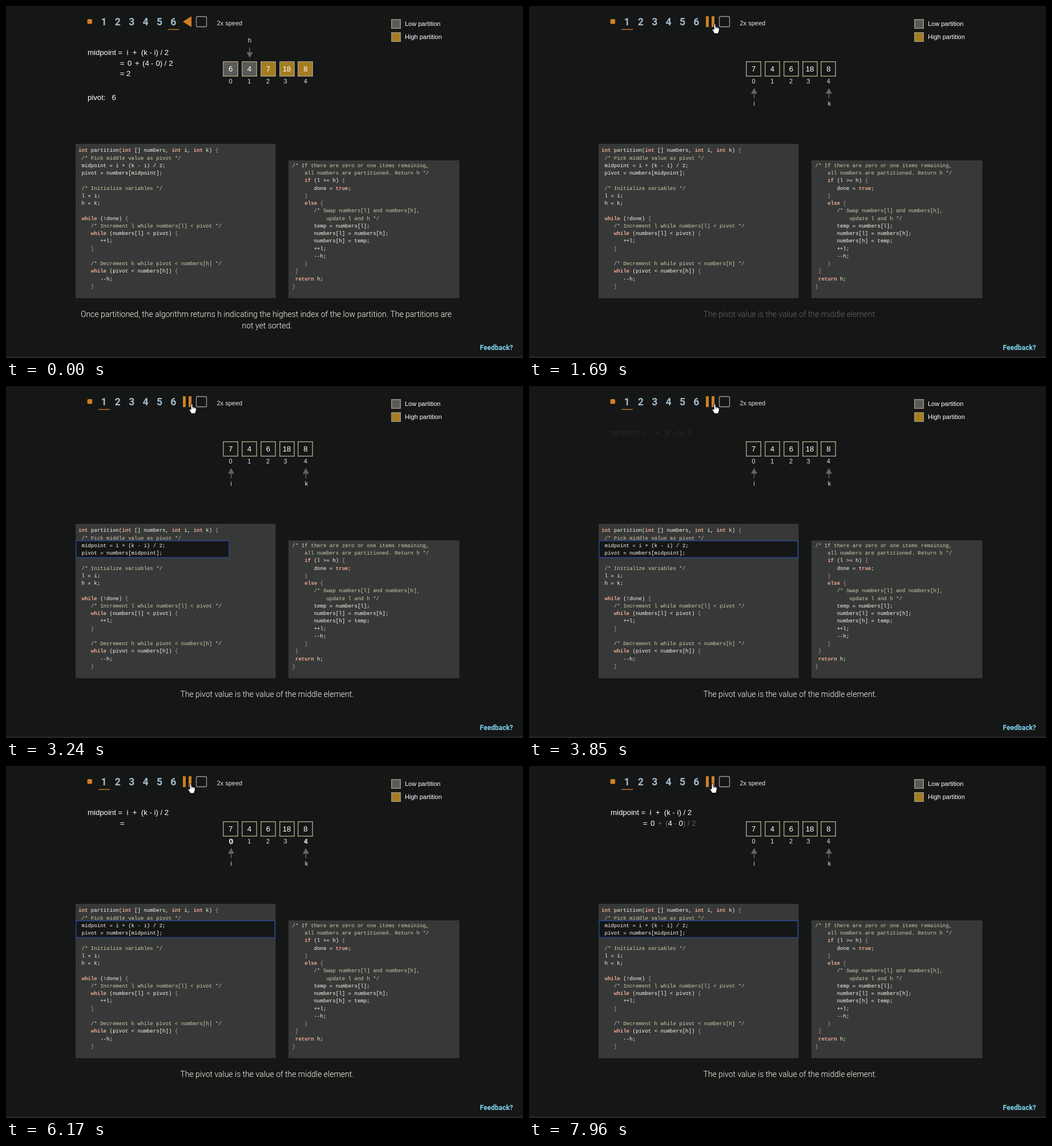
Recreate the animation shown at these times as an HTML page with a canvas. Size 906 by 618 pixels, loop 8000 ms.

```html
<!DOCTYPE html>
<html lang="en">
<head>
<meta charset="utf-8">
<title>Partition walkthrough</title>
<style>
  html, body { margin: 0; width: 100%; height: 100%; overflow: hidden; background: #151716; }
  canvas { display: block; }
</style>
</head>
<body>
<canvas id="stage" width="906" height="618"></canvas>
<script>
const ctx = document.getElementById('stage').getContext('2d');
const LOOP = 8000, TICK = 77.35, TICK_START = 830;

const SANS = '"Liberation Sans", Arial, sans-serif';
const SMALL = '11px ' + SANS, LARGE = '13.2px ' + SANS;
const CODE = '9.09px "Liberation Mono", "Courier New", monospace';
const CAPTION = '300 14px Roboto, sans-serif';

const C = {
  bg: '#151716', panel: '#373938', white: '#ffffff', pale: '#e6e6e2', caption: '#fffcf0',
  orange: '#cf7f25', step: '#a3bccb', tan: '#9d917c', low: '#595a57', high: '#a57d20',
  arrow: '#636461', keyword: '#f2ab92', brace: '#d0958a', comment: '#d0c9ac', code: '#fbf9ec',
  blue: '#2c4c9c', link: '#7fd4f4'
};

const LEFT_CODE = `int partition(int [] numbers, int i, int k) {
 /* Pick middle value as pivot */
 midpoint = i + (k - i) / 2;
 pivot = numbers[midpoint];

 /* Initialize variables */
 l = i;
 h = k;

 while (!done) {
    /* Increment l while numbers[l] < pivot */
    while (numbers[l] < pivot) {
       ++l;
    }

    /* Decrement h while pivot < numbers[h] */
    while (pivot < numbers[h]) {
       --h;
    }`;

const RIGHT_CODE = `/* If there are zero or one items remaining,
    all numbers are partitioned. Return h */
    if (l >= h) {
       done = true;
    }
    else {
       /* Swap numbers[l] and numbers[h],
           update l and h */
       temp = numbers[l];
       numbers[l] = numbers[h];
       numbers[h] = temp;
       ++l;
       --h;
    }
 }
 return h;
}`;

const progress = (t, start, length) => Math.min(1, Math.max(0, (t - start) / length));
const swing = (t, start, length) => 0.5 - Math.cos(Math.PI * progress(t, start, length)) / 2;
const mix = (a, b, p) => a + (b - a) * p;

function text(str, x, y, font, color, align = 'left', alpha = 1) {
  if (alpha <= 0) return;
  ctx.globalAlpha = alpha;
  ctx.font = font;
  ctx.fillStyle = color;
  ctx.textAlign = align;
  ctx.fillText(str, x, y);
  ctx.globalAlpha = 1;
}

function rect(x, y, w, h, color) {
  ctx.fillStyle = color;
  ctx.fillRect(x, y, w, h);
}

function framed(x, y, w, h, fill, stroke, line) {
  rect(x, y, w, h, fill);
  ctx.strokeStyle = stroke;
  ctx.lineWidth = line;
  ctx.strokeRect(x + line / 2, y + line / 2, w - line, h - line);
}

function polygon(points, color) {
  ctx.fillStyle = color;
  ctx.beginPath();
  points.forEach(([x, y]) => ctx.lineTo(x, y));
  ctx.fill();
}

function code(source, x, y) {
  let inComment = false;
  ctx.font = CODE;
  const pitch = ctx.measureText('0').width;
  source.split('\n').forEach((line, row) => {
    const base = y + row * 13.25;
    if (line.includes('/*')) inComment = true;
    if (inComment) {
      text(line, x, base, CODE, C.comment);
      inComment = !line.includes('*/');
      return;
    }
    for (const m of line.matchAll(/\b(?:int|while|if|else|return|true)\b|[{}]|\w+|[^\w\s{}]+/g)) {
      const keyword = /^(int|while|if|else|return|true)$/.test(m[0]);
      const color = keyword ? C.keyword : /[{}]/.test(m[0]) ? C.brace : C.code;
      text(m[0], x + m.index * pitch, base, (keyword ? 'bold ' : '') + CODE, color);
    }
  });
}

function controls(step, playing) {
  ctx.fillStyle = C.orange;
  ctx.beginPath();
  ctx.roundRect(142.5, 23, 8.5, 8.5, 2);
  ctx.fill();
  for (let n = 1; n <= 6; n++) {
    text(n, 171.5 + (n - 1) * 24.35, 33.5, 'bold 17.5px Roboto, sans-serif', C.step, 'center');
  }
  rect(162 + (step - 1) * 24.35, 40.6, 20, 1.3, C.orange);
  if (playing) {
    rect(310, 18, 5, 19, C.orange);
    rect(320, 18, 5, 19, C.orange);
  } else {
    polygon([[310, 27.5], [325, 18], [325, 37]], C.orange);
  }
  ctx.strokeStyle = '#9a9a96';
  ctx.lineWidth = 1.3;
  ctx.beginPath();
  ctx.roundRect(333.5, 18.5, 18, 18, 2);
  ctx.stroke();
  text('2x speed', 369.5, 34, SMALL, C.pale);
}

function legend() {
  [['Low', C.low], ['High', C.high]].forEach(([name, fill], i) => {
    const y = 23 + i * 23;
    framed(675, y, 17, 17, fill, C.tan, 1.5);
    text(name + ' partition', 699, y + 12, SMALL, C.white);
  });
}

function cells(values, split) {
  values.forEach((value, i) => {
    const x = 393.5 + i * 32.8;
    const fill = split < 0 ? C.bg : i <= split ? C.low : C.high;
    framed(Math.round(x - 13.3), 97, 27, 27, fill, C.tan, 1.6);
    text(value, x + 0.2, 115, LARGE, C.white, 'center');
    text(i, i === 3 ? 489.5 : x, 136, SMALL, C.pale, 'center');
  });
}

function arrow(x, tip, dir) {
  polygon([[x, tip], [x - 5.5, tip + dir * 10], [x + 5.5, tip + dir * 10]], C.arrow);
  rect(x - 0.75, Math.min(tip + dir * 9, tip + dir * 18), 1.5, 9, C.arrow);
}

function pointer(name, x, tip, dir) {
  arrow(x, tip, dir);
  text(name, x + (name === 'k' ? 1 : 0), dir > 0 ? tip + 31 : tip - 27, SMALL, C.pale, 'center');
}

function cursor(x, y) {
  ctx.save();
  ctx.translate(x, y);
  ctx.fillStyle = C.white;
  ctx.strokeStyle = '#000';
  ctx.lineWidth = 1;
  ctx.beginPath();
  ctx.moveTo(3.5, 1.5);
  ctx.quadraticCurveTo(5, -0.5, 6.5, 1.5);
  ctx.lineTo(6.5, 5.5);
  ctx.lineTo(11, 6.5);
  ctx.quadraticCurveTo(13, 7, 13, 9);
  ctx.lineTo(12.5, 13);
  ctx.lineTo(11, 17.5);
  ctx.lineTo(4.5, 17.5);
  ctx.lineTo(0.5, 11);
  ctx.quadraticCurveTo(0.5, 8.5, 3.5, 10.5);
  ctx.closePath();
  ctx.fill();
  ctx.stroke();
  ctx.beginPath();
  for (const dx of [6.5, 8.7, 10.9]) {
    ctx.moveTo(dx, 6);
    ctx.lineTo(dx, 9);
  }
  ctx.lineWidth = 0.6;
  ctx.stroke();
  ctx.restore();
}

function formula(alpha, equals, rest) {
  text('midpoint =  i  +  (k - i) / 2', 143, 86, LARGE, C.white, 'left', alpha);
  text('=', 199.7, 105, LARGE, C.white, 'left', equals);
  [['+', 226], ['(', 239], ['-', 254], [') / 2', 269.8]].forEach(([part, x]) =>
    text(part, x, 105, LARGE, C.white, 'left', rest));
}

// Copies of the index labels travel into the formula.
function digits(alpha, move) {
  [['0', 391, 213], ['4', 522.3, 243.4], ['0', 391, 262.5]].forEach(([digit, from, to]) =>
    text(digit, mix(from, to, move), mix(137, 105, move), LARGE, C.white, 'left', alpha));
}

function finished() {
  cells([6, 4, 7, 18, 8], 1);
  pointer('h', 427, 91, -1);
  formula(1, 1, 1);
  digits(1, 1);
  text('= 2', 199.7, 123, LARGE, C.white);
  text('pivot:   6', 143, 165, LARGE, C.white);
}

function restarted(t) {
  cells([7, 4, 6, 18, 8], -1);
  pointer('i', 394.5, 144, 1);
  pointer('k', 525.5, 144, 1);
  formula(swing(t, 3700, 850), swing(t, 4700, 800), swing(t, 7640, 800));
  digits(swing(t, 5640, 840), swing(t, 6560, 1010));
}

function captions(t) {
  const old = 1 - swing(t, 1190, 340);
  text('Once partitioned, the algorithm returns h indicating the highest index of the low partition. The partitions are',
    456, 546, CAPTION, C.caption, 'center', old);
  text('not yet sorted.', 457.5, 566, CAPTION, C.caption, 'center', old);
  text('The pivot value is the value of the middle element.',
    457.5, 546, CAPTION, C.caption, 'center', swing(t, 1590, 250));
}

function draw(t) {
  const playing = t >= 1220;
  rect(0, 0, 906, 618, C.bg);
  rect(0, 616, 906, 1, '#3a3c3b');
  controls(playing ? 1 : 6, playing);
  legend();
  if (playing) restarted(t); else finished();

  rect(122, 242, 350.5, 271, C.panel);
  rect(495, 271, 299.5, 242, C.panel);
  const width = 350 * swing(t, 2590, 950);
  if (t > 2680) framed(122, 271, Math.max(3, width), 31, C.bg, C.blue, 1.4);
  code(LEFT_CODE, 127, 256.3);
  code(RIGHT_CODE, 501.5, 282.8);

  captions(t);
  text('Feedback?', 830.5, 604, 'bold 12px Roboto, sans-serif', C.link);

  if (t >= 830) {
    const enter = 1 - (1 - progress(t, 800, 340)) ** 2;
    const drift = 2 * swing(t, 5700, 300) + 2 * swing(t, 6640, 400);
    cursor(mix(346, 320.5, enter) - drift, mix(-18, 31, enter) - drift / 4);
  }
}

function frame(now) {
  const t = now % LOOP;
  // The picture is held for one tick at a time, like a screen recording.
  draw(t < TICK_START ? 0 : TICK_START + 10 + Math.floor((t - TICK_START) / TICK) * TICK);
  requestAnimationFrame(frame);
}

draw(0);
requestAnimationFrame(frame);
</script>
</body>
</html>
```
